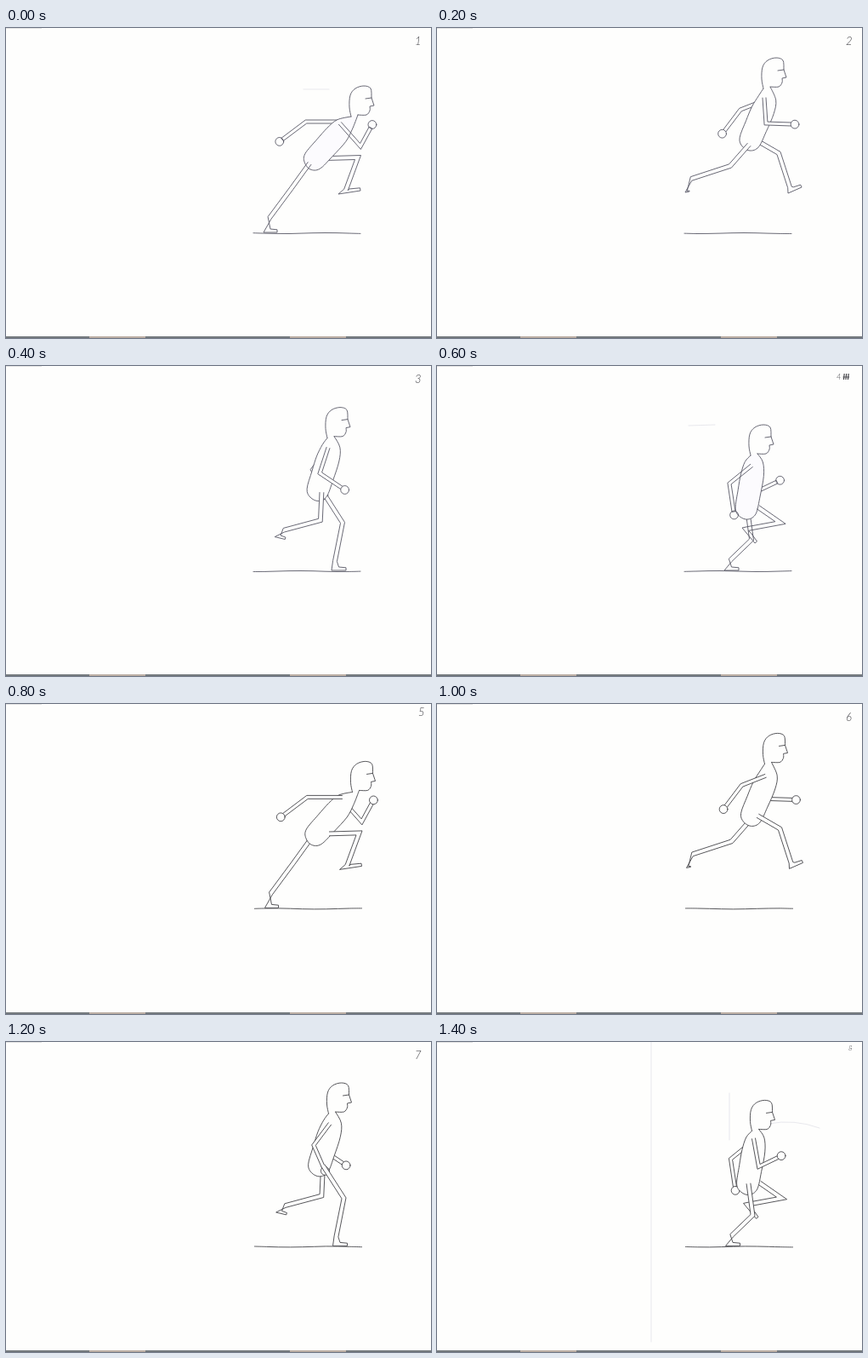
An HTML page that plays this animation: 500x364 px, repeating every 1600 ms.

```html
<!DOCTYPE html>
<html lang="en">
<head>
<meta charset="utf-8">
<title>Run cycle</title>
<style>
html, body { margin: 0; width: 100%; height: 100%; overflow: hidden; background: #fefefd; }
svg { display: block; width: 100%; height: 100%; }
.pose {
  --paper: #fefefd;
  fill: none; stroke: #444449; stroke-width: .9; stroke-linecap: round; stroke-linejoin: round;
  visibility: hidden;
  animation: show 1.6s step-end infinite;
  animation-delay: calc(var(--i) * 200ms - 1600ms);
}
.rough { stroke: #595966; }
.body { fill: var(--paper); }
.sheer .body { fill: none; }
.sheer .torso { fill: #fcfbfe; }
.faint { stroke: #dfdfe6; stroke-width: .7; }
text { font: italic 300 13px Lato, "Open Sans", sans-serif; fill: #444449; stroke: none; }
@keyframes show { 0% { visibility: visible; } 12.5%, 100% { visibility: hidden; } }
</style>
</head>
<body>
<svg id="stage" viewBox="0 0 500 364" preserveAspectRatio="none">
  <path d="M0 0H42" stroke="#c9c9c9"/>
  <path d="M0 363H500" stroke="#747a7e" stroke-width="2.2"/>
  <path d="M98 363H164M334 363H400" stroke="#bcaea4" stroke-width="2.2"/>
</svg>
<script>
const points = s => s.split(" ").map(p => p.split(",").map(Number));
const add = (a, b, k = 1) => a.map((v, i) => v + b[i] * k);
const sub = (a, b) => add(a, b, -1);
const lerp = (a, b, k) => add(a, sub(b, a), k);
const dist = (a, b) => Math.hypot(...sub(a, b));
const unit = (a, b) => sub(b, a).map(v => v / dist(a, b));
const turn = ([x, y]) => [y, -x];

// Joints. spine: nape, chest, pelvis. Arms: shoulder, elbow, wrist.
// Legs: hip, knee, ankle, heel, toe.
const joints = rig => Object.fromEntries(Object.entries(rig).map(([k, s]) => [k, points(s)]));

const pushOff = joints({
  spine: "406,104 402,108 358,166",
  armA: "393,112 417,139 429,117",
  armB: "394,110 353,110 325,131",
  legA: "379,153 414,152 400,190 391,195 417,191",
  legB: "357,159 336,188 310,223 303,240 319,240"
});
const flight = joints({
  spine: "384,71 390,76 368,144",
  armA: "385,82 387,112 417,113",
  armB: "385,85 357,96 338,121",
  legA: "376,132 402,147 415,187 413,194 429,187",
  legB: "367,137 345,162 299,177 292,193 297,192"
});
const support = joints({
  spine: "369,105 373,106 366,180",
  armA: "370,117 344,138 349,171",
  armB: "371,114 377,147 400,136",
  legA: "365,167 370,204 345,228 338,240 355,240",
  legB: "378,166 404,184 366,191 359,190 374,208"
});

// Swing every bone from one angle and length to another
function mixChain(a, b, k) {
  const out = [lerp(a[0], b[0], k)];
  for (let i = 1; i < a.length; i++) {
    const [u, v] = [a, b].map(c => sub(c[i], c[i - 1]));
    const from = Math.atan2(u[1], u[0]);
    const gap = Math.atan2(v[1], v[0]) - from;
    const angle = from + Math.atan2(Math.sin(gap), Math.cos(gap)) * k;
    const len = Math.hypot(...u) * (1 - k) + Math.hypot(...v) * k;
    out.push(add(out[i - 1], [Math.cos(angle), Math.sin(angle)], len));
  }
  return out;
}

const landing = Object.fromEntries(Object.keys(flight).map(k => [k, mixChain(flight[k], support[k], .4)]));
landing.legA = [landing.legA[0], ...points("396,184 387,229 383,240 400,240")];

const cycle = [pushOff, flight, landing, support];

// Shared shapes: head relative to the nape, torso as (part of spine, half width)
const face = points("24,-22 27,-13 22,-12");
const skull = points("0,0 -2,-11 -1,-25 5,-33 15,-36 23,-33 24,-22");
const jaw = points("22,-12 22,-7 18,-2 8,-2");
const trunk = points(".1,-10 .3,-13.5 .55,-15 .85,-16 .97,-10 1,0 .9,8.5 .62,11.5 .3,13.5 .08,11");

const line = pts => pts.map(p => p.map(v => v.toFixed(1))).join("L");

// Catmull-Rom spline, without the leading move
const spline = pts => pts.slice(1).map((c, i) => {
  const b = pts[i], a = pts[i - 1] || b, e = pts[i + 2] || c;
  const ctrl = [add(b, sub(c, a), 1 / 6), add(c, sub(e, b), -1 / 6), c];
  return "C" + ctrl.map(p => p.map(v => v.toFixed(1))).join(" ");
}).join("");

const path = (d, cls = "body") => `<path class="${cls}" d="M${d}"/>`;

// Both edges of a bent limb
function edges([a, b, c], w) {
  const n1 = turn(unit(a, b)), n2 = turn(unit(b, c));
  const sum = add(n1, n2);
  const miter = sum.map(v => v * 2 / (sum[0] ** 2 + sum[1] ** 2));
  return [w, -w].map(k => [add(a, n1, k), add(b, miter, k), add(c, n2, k)]);
}

function arm(chain) {
  const [l, r] = edges(chain, 2);
  const [x, y] = add(chain[2], unit(chain[1], chain[2]), 4);
  return path(line([...l, ...r.reverse()])) + `<circle class="body" cx="${x}" cy="${y}" r="4.9"/>`;
}

function leg(chain) {
  const [, , ankle, heel, toe] = chain;
  const [l, r] = edges(chain, 2.4).sort((p, q) => dist(p[2], heel) - dist(q[2], heel));
  const up = turn(unit(heel, toe));
  const lean = sub(ankle, heel);
  const side = Math.sign(up[0] * lean[0] + up[1] * lean[1]);
  const rise = Math.min(4, dist(heel, toe) / 4) * side;
  const instep = add(lerp(heel, toe, .5), up, rise);
  return path(line([...l, heel, toe, add(toe, up, rise * .8), instep, ...r.reverse()]));
}

function trunkAndHead([nape, chest, pelvis]) {
  const side = turn(unit(pelvis, chest)).map(v => -v);
  const at = shape => shape.map(p => add(nape, p));
  const sides = trunk.map(([t, w]) => add(lerp(chest, pelvis, t), side, w));
  const chin = at(jaw);
  const hull = [nape, ...sides, chin[3]];
  return path(nape + spline(hull), "body torso") +
    path(nape + spline(at(skull)) + "L" + line(at(face)) + spline(chin)) +
    path(line(at(points("17,-21 24,-22"))));
}

function ground(phase) {
  const pts = [];
  for (let x = 291; x <= 417; x += 14) pts.push([x, 241 + .5 * Math.sin(x / 16 + phase)]);
  return path(pts[0] + spline(pts), "");
}

// Number in the corner and the faint marks left on each sheet
const label = (x, y, text, size = 13) => `<text x="${x}" y="${y}" style="font-size:${size}px">${text}</text>`;
const labels = [
  label(481, 20, 1), label(481, 20, 2), label(481, 20, 3),
  label(470, 16, '4 <tspan font-weight="700" text-decoration="line-through">III</tspan>', 9),
  label(485, 14, 5), label(481, 20, 6), label(481, 20, 7), label(484, 10, 8, 8)
];
const marks = { 0: "350,72H380", 3: "296,70L327,69", 7: "252,0V352M390,96Q420,90 450,101M344,60V115" };

function sheet(i) {
  const rig = cycle[i % 4], second = i > 3;
  const [near, far] = second && i % 4 < 2 || !second ? ["A", "B"] : ["A", "B"];
  const front = second ? arm(rig.armB) + leg(rig.legA) : leg(rig.legB) + arm(rig.armA);
  const back = second ? arm(rig.armA) + leg(rig.legB) : arm(rig.armB) + leg(rig.legA);
  const look = second ? "clean" : i % 3 ? "rough" : "rough sheer";
  return `<g class="pose ${look}" style="--i:${i}">` +
    (marks[i] ? path(marks[i], "faint") : "") +
    `<g transform="translate(${second ? "1.5 -.6" : "0 0"})">` +
    ground(i) + back + trunkAndHead(rig.spine) + front + `</g>${labels[i]}</g>`;
}

document.getElementById("stage").insertAdjacentHTML("beforeend",
  Array.from({ length: 8 }, (_, i) => sheet(i)).join(""));
</script>
</body>
</html>
```
